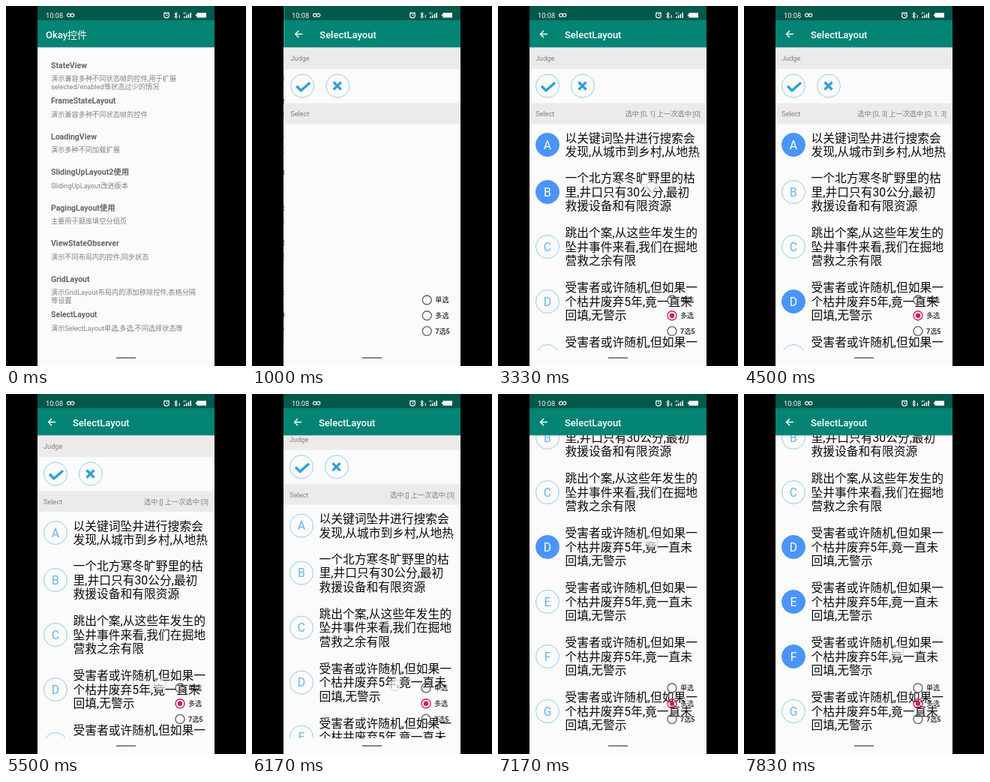
Recreate the animation shown at these times as an HTML page with a canvas. Size 320 px wide and 480 px high, loop 8 s.

```html
<!DOCTYPE html>
<html lang="zh">
<head>
<meta charset="utf-8">
<style>
  html, body { margin: 0; width: 100%; height: 100%; overflow: hidden; background: #000; }
  canvas { display: block; width: 100vw; height: 100vh; }
</style>
</head>
<body>
<canvas id="stage" width="320" height="480"></canvas>
<script>
const ctx = document.getElementById('stage').getContext('2d');
const FONT = 'Roboto, "Noto Sans CJK SC", "Noto Sans CJK", sans-serif';
const LOOP = 8000, STEP = 1000 / 6;
const LEFT = 42, WIDTH = 236;
const PAPER = '#fbfbfb', TEAL = '#048475', DARK_TEAL = '#03584c', BAND = '#ebebec';
const RING = '#92cbee', LETTER = '#68b5ea', BLUE = '#4a95fa', RED = '#d81b60';
const INK = '#0c0c0c', DARK_GREY = '#666', GREY = '#808080';

const menu = [
  ['StateView', '演示兼容多种不同状态帧的控件,用于扩展', 'selected/enabled等状态过少的情况'],
  ['FrameStateLayout', '演示兼容多种不同状态帧的控件'],
  ['LoadingView', '演示多种不同加载扩展'],
  ['SlidingUpLayout2使用', 'SlidingUpLayout改进版本'],
  ['PagingLayout使用', '主要用于题库填空分组页'],
  ['ViewStateObserver', '演示不同布局内的控件,同步状态'],
  ['GridLayout', '演示GridLayout布局内的添加移除控件,表格分隔', '等设置'],
  ['SelectLayout', '演示SelectLayout单选,多选,不同选择状态等']
];

const lastAnswer = ['受害者或许随机,但如果一', '个枯井废弃5年,竟一直未', '回填,无警示'];
const answers = [
  ['以关键词坠井进行搜索会', '发现,从城市到乡村,从地热'],
  ['一个北方寒冬旷野里的枯', '里,井口只有30公分,最初', '救援设备和有限资源'],
  ['跳出个案,从这些年发生的', '坠井事件来看,我们在掘地', '营救之余有限'],
  lastAnswer, lastAnswer, lastAnswer, lastAnswer
];
const answerY = i => i ? 175 + 73 * i : 185;

// Time and index of every answer tap
const toggles = [
  [2830, 0], [3330, 1], [3660, 3], [4160, 1], [5000, 0], [5500, 3],
  [6990, 3], [7330, 4], [7660, 5]
];
const SLIDE_START = 588, SLIDE_TIME = 500, MODE_TAP = 2160;

const clamp = v => Math.max(0, Math.min(1, v));
const smooth = p => p * p * (3 - 2 * p);

function text(str, x, middle, size, color, weight = 400, align = 'left') {
  ctx.font = `${weight} ${size}px ${FONT}`;
  ctx.fillStyle = color;
  ctx.textAlign = align;
  ctx.fillText(str, x, middle + size * 0.37);
}

function rect(x, y, w, h, color) {
  ctx.fillStyle = color;
  ctx.fillRect(x, y, w, h);
}

function disc(x, y, r, fill, stroke, width = 1) {
  ctx.beginPath();
  ctx.arc(x, y, r, 0, Math.PI * 2);
  if (fill) { ctx.fillStyle = fill; ctx.fill(); }
  if (stroke) { ctx.strokeStyle = stroke; ctx.lineWidth = width; ctx.stroke(); }
}

function line(path, color, width) {
  ctx.strokeStyle = color;
  ctx.lineWidth = width;
  ctx.stroke(new Path2D(path));
}

function clipped(x, y, w, h, draw) {
  ctx.save();
  ctx.beginPath();
  ctx.rect(x, y, w, h);
  ctx.clip();
  draw();
  ctx.restore();
}

function shifted(dx, dy, draw) {
  ctx.save();
  ctx.translate(dx, dy);
  draw();
  ctx.restore();
}

function toolbar() {
  rect(LEFT, 55, WIDTH, 1, 'rgba(0,0,0,.12)');
  rect(LEFT, 0, WIDTH, 19, DARK_TEAL);
  rect(LEFT, 19, WIDTH, 36, TEAL);
}

function statusIcons() {
  const white = '#f4faf9';
  text('10:08', 53, 12.3, 9.3, white);
  disc(83.7, 12.3, 2.2, null, white, 1.1);
  disc(88.6, 12.3, 2.2, null, white, 1.1);
  disc(214, 12.5, 3.4, null, white, 1.2);
  line('M214 10.5v2.2h1.6M210 9.7l1.8-1.6M218 9.7l-1.8-1.6', white, 1);
  line('M224.3 10l4.4 4.4-2.2 2.1v-8l2.2 2.1-4.4 4.4M231.3 12v4', white, 1);
  text('4G', 236, 10, 4, white);
  for (let i = 0; i < 4; i++) rect(237 + i * 2.8, 14 - i * 1.7, 1.6, 2 + i * 1.7, white);
  rect(254.5, 9, 12.5, 6.5, white);
  rect(253, 11, 1.6, 2.4, white);
}

function menuPage(t) {
  rect(LEFT, 0, WIDTH, 480, PAPER);
  if (t >= 490) rect(LEFT, 402, WIDTH, 46, 'rgba(0,0,0,.08)');
  menu.forEach(([title, ...lines], i) => {
    const y = 79 + i * 47.5;
    text(title, 60, y, 10.5, DARK_GREY, 700);
    lines.forEach((s, n) => text(s, 60, y + 18 + n * 10.7, 9.2, GREY));
  });
  toolbar();
  text('Okay控件', 53, 38, 13, '#fff', 500);
}

function selection(t) {
  let now = [], before = [];
  const done = toggles.filter(([at]) => t >= at);
  for (const [, i] of done) {
    before = now;
    now = now.includes(i) ? now.filter(n => n !== i) : [...now, i].sort();
  }
  const label = done.length ? `选中:[${now.join(', ')}] 上一次选中:[${before.join(', ')}]` : '';
  return { now, label };
}

function content(t) {
  const { now, label } = selection(t);
  rect(LEFT, 55, WIDTH, 29, BAND);
  text('Judge', 50, 70, 9.2, GREY);
  disc(66, 106.5, 15.5, null, RING);
  disc(113, 106.5, 15.5, null, RING);
  line('M58 106.7l6 6 12-10.5', '#2f9fd8', 3.4);
  line('M107.5 101.5l10 10M117.5 101.5l-10 10', '#2f9fd8', 3.2);
  rect(LEFT, 129.5, WIDTH, 27.5, BAND);
  text('Select', 50, 144, 9.2, GREY);
  text(label, 270, 144, 9.2, GREY, 400, 'right');
  if (t < MODE_TAP) return;
  answers.forEach((lines, i) => {
    const y = answerY(i), on = now.includes(i);
    disc(66, y, 15.5, on ? BLUE : null, on ? BLUE : RING);
    text('ABCDEFG'[i], 66, y, 15.75, on ? '#fff' : LETTER, 400, 'center');
    lines.forEach((s, n) =>
      text(s, 89.6, y + (n - (lines.length - 1) / 2) * 18.4, 15.75, INK));
  });
}

function radios(t) {
  const age = t - MODE_TAP;
  ['单选', '多选', '7选5'].forEach((label, i) => {
    const y = 392 + i * 20.7, on = i === 1 && age >= 0;
    text(label, 243, y, 9.1, INK, 500);
    if (on && age < 300) disc(232, y, 14, 'rgba(150,150,150,.25)');
    disc(232, y, 6, null, on ? RED : DARK_GREY, 1.4);
    if (on) disc(232, y, age < 200 ? 5.4 : 3.2, RED);
  });
}

function edgeGlow(t) {
  if (t < 6480 || t > 6990) return;
  const strength = 1 - (t - 6500) / 500;
  const height = 28 * strength;
  const r = (130 * 130 + height * height) / (2 * height);
  clipped(LEFT, 400, WIDTH, 59, () =>
    disc(160, 459 - height + r, r, `rgba(0,133,119,${0.18 * strength})`));
}

function touch(x, y) {
  disc(x, y, 7.5, 'rgba(255,255,255,.6)', 'rgba(110,110,110,.3)');
}

function touches(t, scroll) {
  for (const [at, i] of toggles) {
    if (t >= at && t < at + 200) touch(205, answerY(i) - scroll - 7);
  }
  if (t > 6100 && t < 6400) touch(190, 397.5 - scroll);
}

function selectPage(t) {
  const scroll = 190 * smooth(clamp((t - 6117) / 370));
  rect(LEFT, 0, WIDTH, 480, PAPER);
  clipped(LEFT, 55, WIDTH, 404, () => {
    shifted(0, -scroll, () => content(t));
    edgeGlow(t);
    radios(t);
  });
  toolbar();
  line('M66 37.5H56.5M61 33l-4.5 4.5 4.5 4.5', '#fff', 1.4);
  text('SelectLayout', 89, 38, 13, '#fff', 500);
  touches(t, scroll);
}

function render(t) {
  rect(0, 0, 320, 480, '#000');
  clipped(LEFT, 0, WIDTH, 480, () => {
    const offset = WIDTH * (1 - clamp((t - SLIDE_START) / SLIDE_TIME)) ** 3;
    if (offset) shifted((offset - WIDTH) * 0.3, 0, () => menuPage(t));
    if (offset < WIDTH) shifted(offset, 0, () => selectPage(t));
    statusIcons();
    rect(147, 468.2, 26, 2, '#808080');
  });
}

function tick(now) {
  const step = Math.floor((now % LOOP + 4) / STEP) % 48;
  render(step * STEP);
  requestAnimationFrame(tick);
}
requestAnimationFrame(tick);
</script>
</body>
</html>
```
